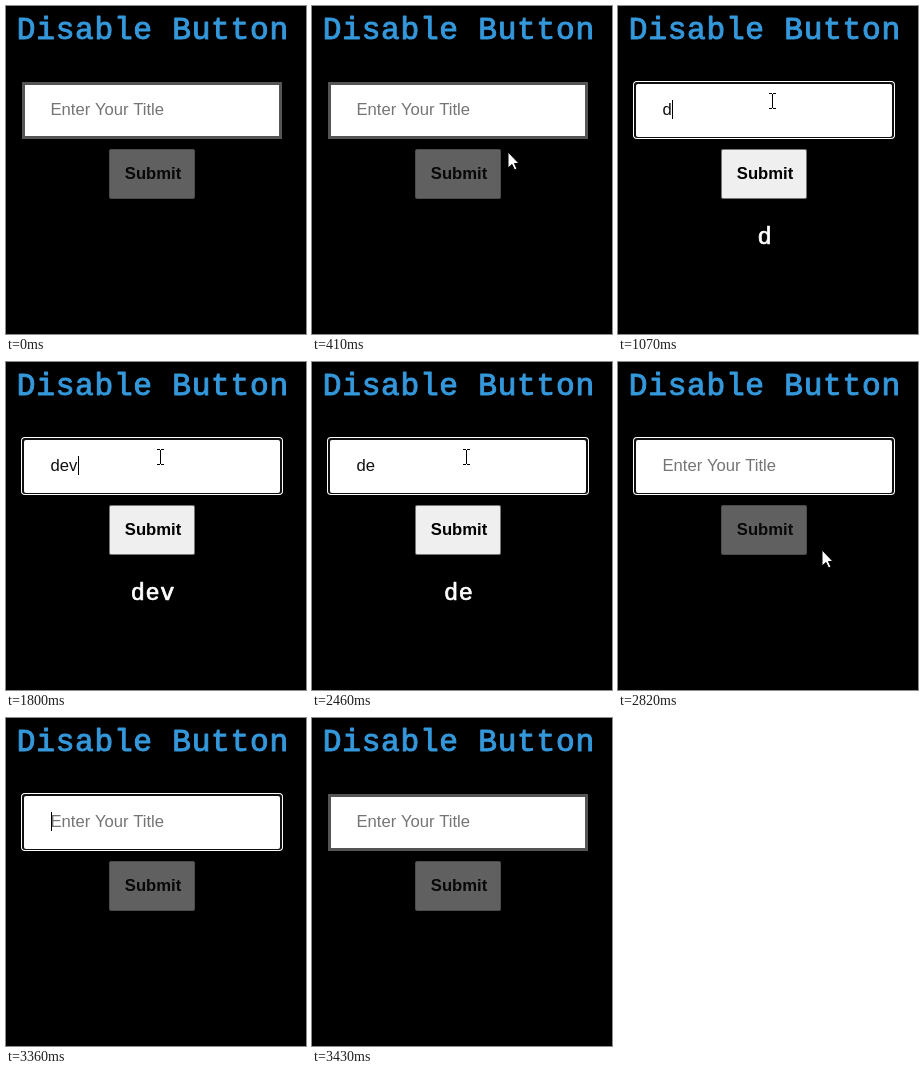
An HTML page with a canvas for the animation above (3500 ms loop, 300 px wide and 328 px high).

```html
<!DOCTYPE html>
<html lang="en">
<head>
<meta charset="utf-8">
<title>Disable Button</title>
<style>
html, body { margin: 0; width: 100%; height: 100%; overflow: hidden; background: #000; }
canvas { display: block; width: 300px; height: 328px; }
</style>
</head>
<body>
<canvas id="stage" width="300" height="328"></canvas>
<script>
const ctx = document.getElementById('stage').getContext('2d');
const SANS = '"Liberation Sans", Arial, sans-serif';
const MONO = '"Liberation Mono", "DejaVu Sans Mono", monospace';

const LOOP = 3500, STEP = 70, BLINK = 530;
const CLICK = 540, BLUR = 3430;
const WORD = 'dev';
const INSERTS = [1070, 1340, 1800];
const ERASES = [2460, 2680, 2820];

const REST = { x: 154, y: 95 };
const ENTER = { x: 300, y: 272 };
const EXIT = { x: 278, y: 328 };

const past = (times, t) => times.filter(time => time <= t);

function typedAt(t) {
  return WORD.slice(0, past(INSERTS, t).length - past(ERASES, t).length);
}

const focusedAt = t => t >= CLICK && t < BLUR;

// Each inserted letter restarts the blink
function caretAt(t) {
  const last = Math.max(CLICK, ...past(INSERTS, t));
  return focusedAt(t) && Math.floor((t - last) / BLINK) % 2 === 0;
}

function glide(from, to, p) {
  return {
    x: Math.round(from.x + (to.x - from.x) * p),
    y: Math.round(from.y + (to.y - from.y) * p)
  };
}

// The pointer is sampled once per step
function pointerAt(t) {
  const s = Math.floor(t / STEP) * STEP;
  const arrive = Math.min(1, s / 490);
  const leave = Math.max(0, (s - 2660) / 350);
  return s < 2660 ? glide(ENTER, REST, arrive) : glide(REST, EXIT, (Math.round(leave * 5)) / 5);
}

function box(x, y, w, h, r, color) {
  ctx.fillStyle = color;
  ctx.beginPath();
  ctx.roundRect(x, y, w, h, r);
  ctx.fill();
}

function label(str, x, y, font, color, align = 'left') {
  ctx.font = font;
  ctx.fillStyle = color;
  ctx.textAlign = align;
  ctx.fillText(str, x, y);
}

// Semi-bold monospace heading: regular weight with a thin outline
function heading(str, y, size, color) {
  ctx.letterSpacing = size * 0.023 + 'px';
  label(str, 146.8, y, size + 'px ' + MONO, color, 'center');
  ctx.strokeStyle = color;
  ctx.lineWidth = size / 32;
  ctx.lineJoin = 'round';
  ctx.strokeText(str, 146.8, y);
  ctx.letterSpacing = '0px';
}

function drawInput(value, focused, caretOn) {
  if (focused) {
    box(15, 75, 262, 58, 4, '#fff');
    box(16, 76, 260, 56, 3, '#101010');
    box(18, 78, 256, 53, 2, '#fff');
  } else {
    box(16, 76, 260, 57, 0, '#555');
    box(19, 79, 254, 51, 0, '#fff');
  }
  label(value || 'Enter Your Title', 44.5, 109, '16.67px ' + SANS, value ? '#111' : '#757575');
  if (caretOn) {
    const x = value ? Math.round(45 + ctx.measureText(value).width) : 45;
    box(x, 94, 1, 19, 0, '#000');
  }
}

function drawButton(enabled) {
  box(103, 143, 86, 50, 2, enabled ? '#767676' : '#4c4c4c');
  box(104, 144, 84, 48, 1, enabled ? '#efefef' : '#606060');
  label('Submit', 147, 173, 'bold 16.67px ' + SANS, enabled ? '#000' : '#080808', 'center');
}

function drawBeam(x, y) {
  box(x, y - 7, 1, 14, 0, '#000');
  for (const edge of [y - 8, y + 7]) {
    box(x - 3, edge, 3, 1, 0, '#000');
    box(x + 1, edge, 3, 1, 0, '#000');
  }
}

function drawArrow(x, y) {
  const shape = new Path2D(`M${x} ${y}v16l4 -3.5l2.5 5.5l2.5 -1l-2.5 -5.5h4.5z`);
  ctx.fillStyle = '#fff';
  ctx.fill(shape);
  ctx.strokeStyle = '#000';
  ctx.lineWidth = 1;
  ctx.stroke(shape);
}

function drawPointer({ x, y }) {
  const overInput = x > 16 && x < 276 && y > 76 && y < 133;
  (overInput ? drawBeam : drawArrow)(x, y);
}

function draw(t) {
  const value = typedAt(t);
  box(0, 0, 300, 328, 0, '#000');
  heading('Disable Button', 33, 31.2, '#3498db');
  drawInput(value, focusedAt(t), caretAt(t));
  drawButton(value !== '');
  heading(value, 238, 23.6, '#fff');
  if (t >= STEP) drawPointer(pointerAt(t));
}

const begin = performance.now();
function tick() {
  draw((performance.now() - begin) % LOOP);
  requestAnimationFrame(tick);
}
tick();
</script>
</body>
</html>
```
